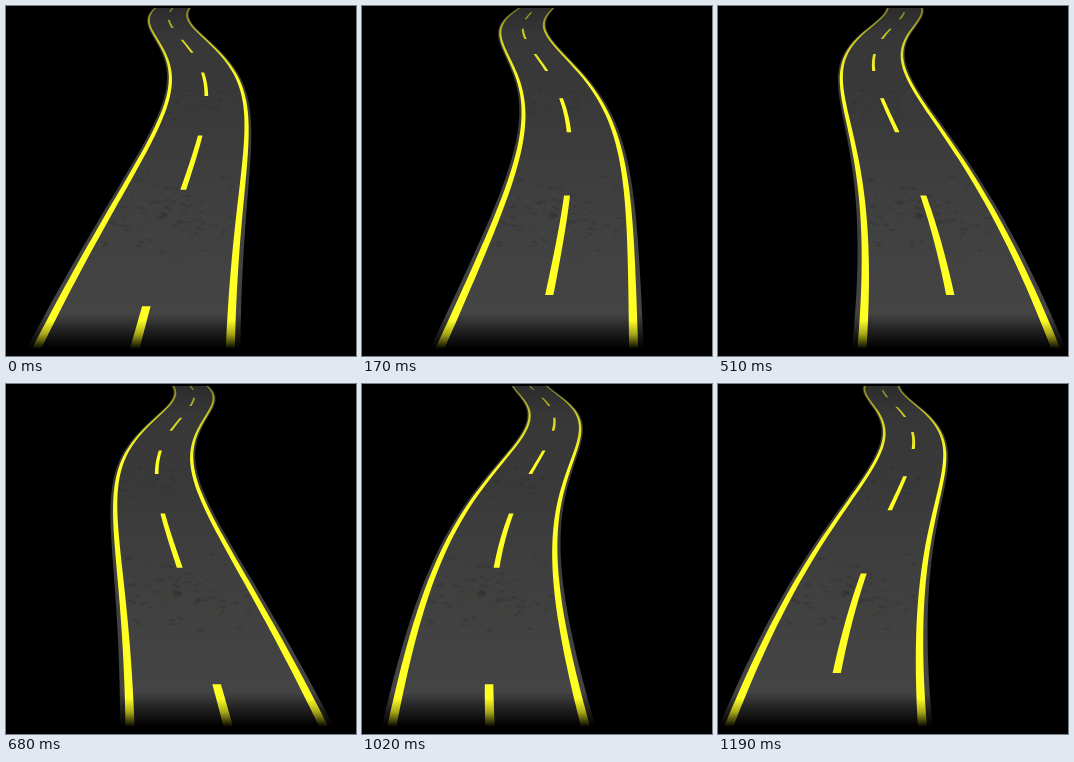
Animation, 350 px wide and 350 px high, one loop 1.36 s. Source, as an HTML page with a canvas:

```html
<!DOCTYPE html>
<html lang="en">
<head>
<meta charset="utf-8">
<title>Winding road</title>
<style>
html, body { margin: 0; width: 100%; height: 100%; overflow: hidden; background: #000; }
canvas { display: block; width: 350px; height: 350px; }
</style>
</head>
<body>
<canvas id="road" width="350" height="350"></canvas>
<script>
const ctx = document.getElementById('road').getContext('2d');
const STEP = 170, STEPS = 8;
const TOP = 2, BOTTOM = 342, HORIZON = -70;
const DASH = 0.00107, GAP_STEP = 0.001155;

// Distance along the road is 1 / depth, widths scale with depth.
const depth = y => y - HORIZON;
const center = (y, k) => {
  const d = depth(y);
  return 175.5 + 0.1615 * d * Math.sin(540 / d - 1.3 + (k - 1) * Math.PI / 4);
};

function fade(stops) {
  const g = ctx.createLinearGradient(0, TOP, 0, BOTTOM);
  for (const [y, color] of stops) g.addColorStop((y - TOP) / (BOTTOM - TOP), color);
  return g;
}
const asphalt = fade([[2, '#2c2c2c'], [30, '#373737'], [110, '#3a3a3a'], [200, '#404040'],
  [308, '#444444'], [324, '#222222'], [342, '#000000']]);
const paint = fade([[2, '#85831c'], [30, '#cbc924'], [75, '#ffff24'], [314, '#ffff24'],
  [328, '#a8a818'], [342, '#0a0a02']]);

function band(from, to, y0, y1, k, fill) {
  const rows = Math.max(2, Math.ceil((y1 - y0) / 3));
  const point = (i, side) => {
    const y = y0 + (y1 - y0) * i / rows;
    ctx.lineTo(center(y, k) + side * depth(y), y);
  };
  ctx.beginPath();
  for (let i = 0; i <= rows; i++) point(i, from);
  for (let i = rows; i >= 0; i--) point(i, to);
  ctx.closePath();
  ctx.fillStyle = fill;
  ctx.fill();
}

let seed = 7;
const rand = () => (seed = seed * 16807 % 2147483647) / 2147483647;
const spread = () => rand() + rand() - 1;

// Faint stains in two belts across the asphalt.
const stains = Array.from({ length: 240 }, (_, i) => ({
  y: i % 3 ? 208 + spread() * 45 : 97 + spread() * 25,
  side: (rand() * 2 - 1) * 0.21,
  size: 0.003 + rand() ** 2 * 0.015,
  tilt: spread() * 0.6,
  color: rand() < 0.4 ? 'rgba(76,62,48,.25)' : 'rgba(40,38,36,.25)'
}));

function drawStains(k) {
  for (const s of stains) {
    const d = depth(s.y);
    ctx.fillStyle = s.color;
    ctx.beginPath();
    ctx.ellipse(center(s.y, k) + s.side * d, s.y, s.size * d, s.size * d * 0.35, s.tilt, 0, Math.PI * 2);
    ctx.fill();
  }
}

function drawDashes(k) {
  for (let n = 0; n < 6; n++) {
    const far = 0.0027 + (2 * n + k % 2) * GAP_STEP;
    const y0 = Math.max(TOP, 1 / far + HORIZON);
    const y1 = Math.min(BOTTOM, 1 / (far - DASH) + HORIZON);
    if (y1 > y0) band(-0.0115, 0.0115, y0, y1, k, paint);
  }
}

function draw(k) {
  ctx.fillStyle = '#000';
  ctx.fillRect(0, 0, 350, 350);
  band(-0.262, 0.256, TOP, BOTTOM, k, asphalt);
  drawStains(k);
  band(-0.249, -0.227, TOP, BOTTOM, k, paint);
  band(0.2205, 0.2425, TOP, BOTTOM, k, paint);
  drawDashes(k);
}

let shown = -1;
const start = performance.now();
function tick() {
  const k = Math.floor((performance.now() - start) / STEP) % STEPS;
  if (k !== shown) draw(shown = k);
  requestAnimationFrame(tick);
}
tick();
</script>
</body>
</html>
```
